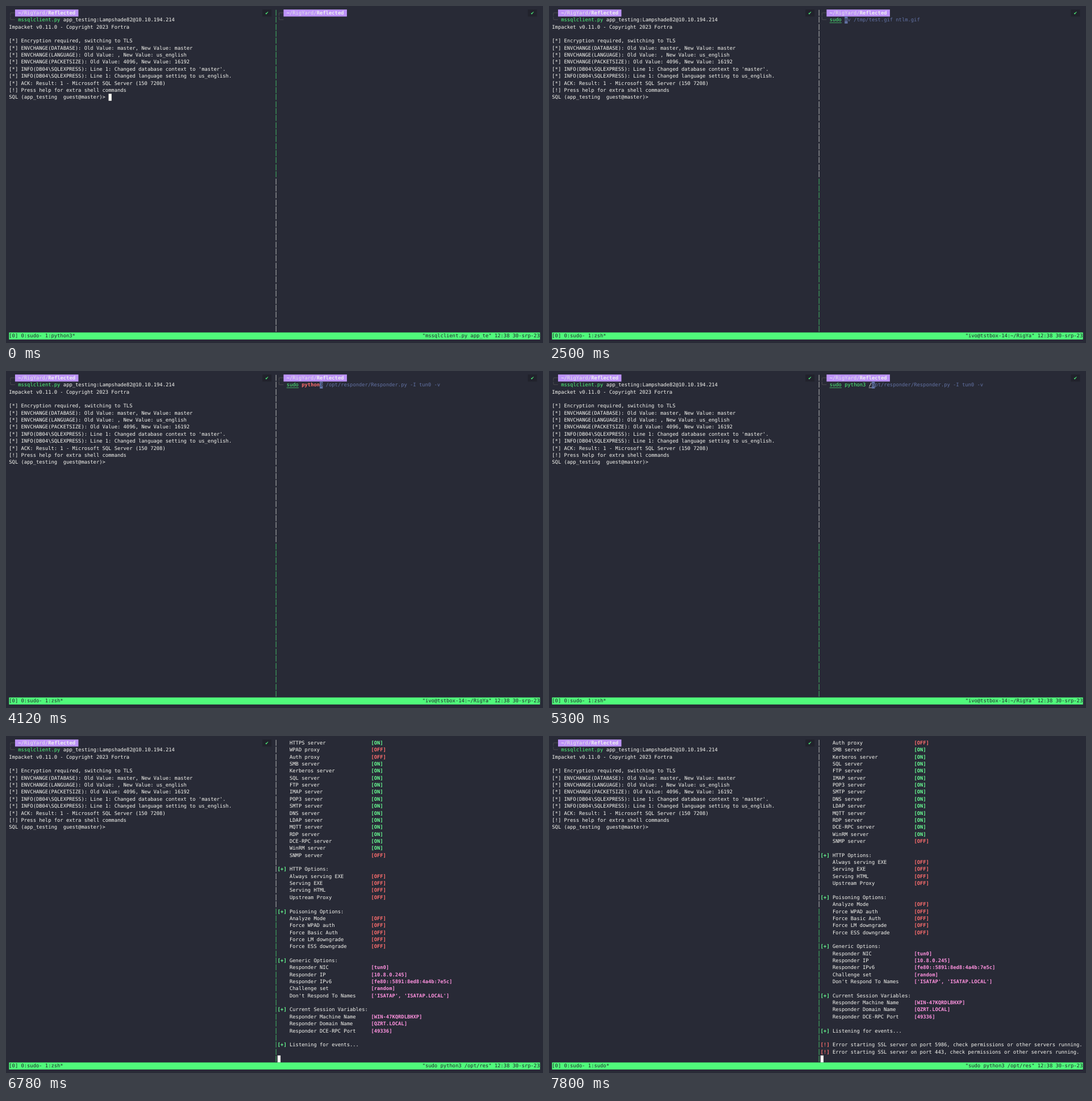
An HTML page for the animation above (8 s loop, 945 by 593 pixels).

```html
<!DOCTYPE html>
<html lang="en">
<head>
<meta charset="utf-8">
<title>Terminal session</title>
<style>
html, body { margin: 0; width: 100%; height: 100%; overflow: hidden; background: #282a36; }
svg { display: block; width: 100vw; height: 100vh; }
text {
  font-family: "DejaVu Sans Mono", "DejaVu Sans", monospace;
  white-space: pre;
  text-rendering: geometricPrecision;
}
</style>
</head>
<body>
<svg id="term" viewBox="0 0 945 593"></svg>
<script>
(() => {
const LOOP = 8000;
const CW = 945 / 178, RH = 593 / 48;   // one cell; margin is one column and half a row
const SIZE = CW / 0.60205;
const RIGHT = 89, INPUT = 92, SPLIT = 88;

const C = {
  bg: '#282a36', fg: '#f8f8f2', black: '#21222c', green: '#50fa7b', purple: '#bd93f9',
  grey: '#6272a4', frame: '#585858', dir: '#e4e4e4', dirBold: '#eeeeee',
  red: '#ff6e6e', lime: '#69ff94', pink: '#ff92df'
};

const colX = c => (c + 1) * CW;
const rowY = r => (r + 0.5) * RH;
const rect = (x, y, w, h, fill) =>
  `<rect x="${x.toFixed(2)}" y="${y.toFixed(2)}" width="${w.toFixed(2)}" height="${h.toFixed(2)}" fill="${fill}"/>`;
const fillCells = (c, r, n, color) => rect(colX(c), rowY(r), n * CW, RH, color);

function put(c, r, str, color = C.fg, style = {}) {
  if (!str) return '';
  const weight = style.bold ? ' font-weight="700"' : '';
  const line = style.under ? rect(colX(c), rowY(r) + SIZE * 1.2, str.length * CW, 0.63, color) : '';
  return `<text x="${colX(c).toFixed(2)}" y="${(rowY(r) + SIZE).toFixed(2)}" font-size="${SIZE.toFixed(4)}" fill="${color}"${weight}>${str}</text>` + line;
}

function cursor(c, r, ch = '', color = C.fg) {
  return fillCells(c, r, 1, color) + put(c, r, ch, C.bg);
}

function prompt(c, check) {
  return put(c, 0, '╭─', C.frame) + put(c, 1, '╰─', C.frame) +
    fillCells(c + 2, 0, 21, C.purple) +
    put(c + 3, 0, '~', C.dirBold, { bold: true }) +
    put(c + 4, 0, '/RigYard/', C.dir) +
    put(c + 13, 0, 'Reflected', C.dirBold, { bold: true }) +
    fillCells(check - 1, 0, 3, C.black) + put(check, 0, '✔', C.green);
}

const session = [
  'Impacket v0.11.0 - Copyright 2023 Fortra',
  '',
  '[*] Encryption required, switching to TLS',
  '[*] ENVCHANGE(DATABASE): Old Value: master, New Value: master',
  '[*] ENVCHANGE(LANGUAGE): Old Value: , New Value: us_english',
  '[*] ENVCHANGE(PACKETSIZE): Old Value: 4096, New Value: 16192',
  "[*] INFO(DB04\\SQLEXPRESS): Line 1: Changed database context to 'master'.",
  '[*] INFO(DB04\\SQLEXPRESS): Line 1: Changed language setting to us_english.',
  '[*] ACK: Result: 1 - Microsoft SQL Server (150 7208)',
  '[!] Press help for extra shell commands',
  'SQL (app_testing  guest@master)> '
];

const leftPane = prompt(0, 85) +
  put(3, 1, 'mssqlclient.py', C.green) +
  put(18, 1, 'app_testing:Lampshade82@10.10.194.214') +
  session.map((s, i) => put(0, i + 2, s)).join('');

function divider(active) {
  let out = '';
  for (let r = 0; r < 46; r++)
    out += put(SPLIT, r, '│', (r < 24) === (active === 'left') ? C.green : C.fg);
  return out;
}

function statusBar(job, title) {
  return fillCells(0, 46, 176, C.green) +
    put(0, 46, `[0] 0:sudo- 1:${job}*`, C.black) +
    put(137, 46, `"${title}" 12:38 30-srp-23`, C.black);
}

const command = 'sudo python3 /opt/responder/Responder.py -I tun0 -v';
const older = 'sudo mv /tmp/test.gif ntlm.gif';

// shell syntax colours for one word of the command line
function wordStyle(word, i) {
  if (i === 0 && word === 'sudo') return [C.green, { under: true }];
  if ((i === 0 && word === 'su') || (i === 1 && word === 'python3')) return [C.green, {}];
  if (i < 2) return [C.red, { bold: true }];
  return [C.fg, { under: i === 2 }];
}

function typedLine(typed) {
  let c = INPUT, out = '';
  typed.split(' ').forEach((word, i) => {
    out += put(c, 1, word, ...wordStyle(word, i));
    c += word.length + 1;
  });
  return out;
}

function inputLine(typed) {
  const hint = typed && (typed.length <= 5 ? older : command).slice(typed.length);
  const end = INPUT + typed.length;
  return typedLine(typed) + put(end + 1, 1, hint.slice(1), C.grey) +
    cursor(end, 1, hint[0], hint ? C.grey : C.fg);
}

// + / - mark switches, "=" gives a value, "#" a heading, "!" an error
const log = `+HTTPS server
-WPAD proxy
-Auth proxy
+SMB server
+Kerberos server
+SQL server
+FTP server
+IMAP server
+POP3 server
+SMTP server
+DNS server
+LDAP server
+MQTT server
+RDP server
+DCE-RPC server
+WinRM server
-SNMP server

#HTTP Options:
-Always serving EXE
-Serving EXE
-Serving HTML
-Upstream Proxy

#Poisoning Options:
-Analyze Mode
-Force WPAD auth
-Force Basic Auth
-Force LM downgrade
-Force ESS downgrade

#Generic Options:
=Responder NIC=tun0
=Responder IP=10.8.0.245
=Responder IPv6=fe80::5891:8ed8:4a4b:7e5c
=Challenge set=random
=Don't Respond To Names='ISATAP', 'ISATAP.LOCAL'

#Current Session Variables:
=Responder Machine Name=WIN-47KQRDLBHXP
=Responder Domain Name=QZRT.LOCAL
=Responder DCE-RPC Port=49336

#Listening for events...

!Error starting SSL server on port 5986, check permissions or other servers running.
!Error starting SSL server on port 443, check permissions or other servers running.`.split('\n');

function logLine(line, r) {
  const [label, value] = line.slice(1).split('=');
  const mark = {
    '#': [RIGHT, '[+]', C.lime], '!': [RIGHT, '[!]', C.red],
    '+': [120, '[ON]', C.lime], '-': [120, '[OFF]', C.red], '=': [120, `[${value}]`, C.pink]
  }[line[0]];
  if (!mark) return '';
  const [c, str, color] = mark;
  return put(c, r, str, color, { bold: true }) + put(RIGHT + 4, r, label);
}

function output(scroll) {
  return log.slice(scroll, scroll + 45).map(logLine).join('') + cursor(RIGHT, 45);
}

const shellTitle = 'ivo@tstbox-14:~/RigYa', runTitle = 'sudo python3 /opt/res';
const rightPrompt = prompt(RIGHT, 173);

const scenes = [[0, () => rightPrompt + cursor(33, 12) +
  divider('left') + statusBar('python3', 'mssqlclient.py app_te')]];

const addScene = (time, pane, job, title) =>
  scenes.push([time, () => pane() + divider('right') + statusBar(job, title)]);

// [time, number of characters on the command line]
[[1260, 0], [1920, 1], [2100, 2], [2190, 3], [2340, 4], [2500, 5], [3450, 6], [3640, 7],
 [3740, 8], [3880, 9], [4020, 10], [4120, 11], [4820, 12], [5130, 13], [5300, 14],
 [6200, command.length]].forEach(([time, n]) =>
  addScene(time, () => rightPrompt + inputLine(command.slice(0, n)), 'zsh', shellTitle));

addScene(6720, () => rightPrompt + typedLine(command) + cursor(RIGHT, 2), 'zsh', runTitle);
addScene(6780, () => output(0), 'zsh', runTitle);
addScene(6830, () => output(2), 'zsh', runTitle);
addScene(7800, () => output(2), 'sudo', runTitle);

const term = document.getElementById('term');
const backdrop = rect(0, 0, 945, 593, C.bg);
let shown = -1;

function draw(t) {
  let i = scenes.length - 1;
  while (scenes[i][0] > t) i--;
  if (i === shown) return;
  shown = i;
  term.innerHTML = backdrop + leftPane + scenes[i][1]();
}

function tick() {
  draw(performance.now() % LOOP);
  requestAnimationFrame(tick);
}
tick();
})();
</script>
</body>
</html>
```
